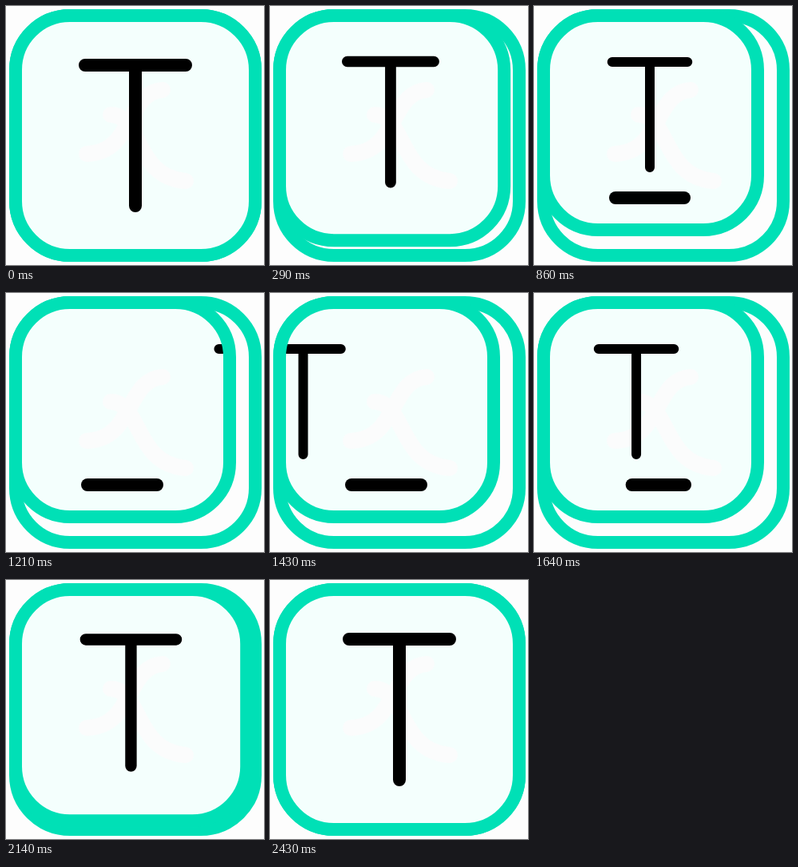
These frames come from a looping animation (323 px wide and 324 px high, 2.78 s). An HTML page:

```html
<!DOCTYPE html>
<html lang="en">
<head>
<meta charset="utf-8">
<title>Letter tile</title>
<style>
  html, body { margin: 0; width: 100%; height: 100%; overflow: hidden; background: #fdfdfd; }
  svg { display: block; width: 100%; height: 100%; }
  .line { fill: none; stroke-width: 16; stroke-linecap: round; stroke-linejoin: round; }
  .ring { stroke: #00e0b6; }
  .ink { stroke: #000; }
  .ghost { stroke: #fbfcfc; stroke-width: 20; }
</style>
</head>
<body>
<svg viewBox="0 0 323 324">
  <defs>
    <clipPath id="clip"><rect class="card" x="12" y="12" rx="68"/></clipPath>
  </defs>
  <rect class="line ring" x="12" y="12" width="300" height="300" rx="68"/>
  <rect class="card" x="12" y="12" rx="68" fill="#f4fffd"/>
  <g clip-path="url(#clip)">
    <path class="line ghost" d="M196 105C150 108 160 184 101 185M131 136C170 136 160 214 225 219"/>
    <path id="bar" class="line ink"/>
    <path id="letter" class="line ink" d="M-63 -88H63M0 -88V88"/>
  </g>
  <rect class="card line ring" x="12" y="12" rx="68"/>
</svg>
<script>
  const LOOP = 2780, STEP = 2430 / 34, LAST = 34;
  const bar = document.getElementById('bar');
  const letter = document.getElementById('letter');
  const cards = document.querySelectorAll('.card');

  const mix = (a, b, p) => a + (b - a) * p;
  const linear = (t, from, to) => Math.min(1, Math.max(0, (t - from) / (to - from)));
  const smooth = s => s * s * (3 - 2 * s);
  const easeInOut = (t, from, to) => smooth(linear(t, from, to));

  // Same curve as CSS ease-out, solved by bisection.
  function easeOut(t, from, to) {
    const x = linear(t, from, to);
    let lo = 0, hi = 1;
    for (let i = 0; i < 20; i++) {
      const s = (lo + hi) / 2;
      if (s * s * (1.74 - 0.74 * s) < x) lo = s; else hi = s;
    }
    return x === 1 ? 1 : smooth(lo);
  }

  // Goes to 1 over the first span and back to 0 over the second.
  const thereAndBack = (t, a, b, c, d) => easeOut(t, a, b) - easeOut(t, c, d);

  function draw(t) {
    const size = 300 - 32 * thereAndBack(t, 0, 690, 1880, 2430);
    cards.forEach(c => {
      c.setAttribute('width', size);
      c.setAttribute('height', size);
    });

    const move = thereAndBack(t, 0, 610, 1870, 2430);
    const scale = 1 - 0.25 * thereAndBack(t, 0, 725, 1938, 2430);
    const slide = t < 1290
      ? 185 * easeInOut(t, 880, 1290)
      : -185 * (1 - easeOut(t, 1290, 1760));
    letter.setAttribute('transform',
      `translate(${162 - 17 * move + slide} ${162 - 26 * move}) scale(${scale})`);

    const head = easeOut(t, 600, 880);
    const tail = easeOut(t, 1600, 1890);
    const visible = head > 0 && tail < 1;
    bar.setAttribute('d', visible ? `M${mix(102, 189, tail)} 240H${mix(102, 189, head)}` : '');
  }

  const start = performance.now();
  function tick() {
    const t = (performance.now() - start) % LOOP;
    draw(Math.min(LAST, Math.floor((t + 6) / STEP)) * STEP);
    requestAnimationFrame(tick);
  }
  tick();
</script>
</body>
</html>
```
